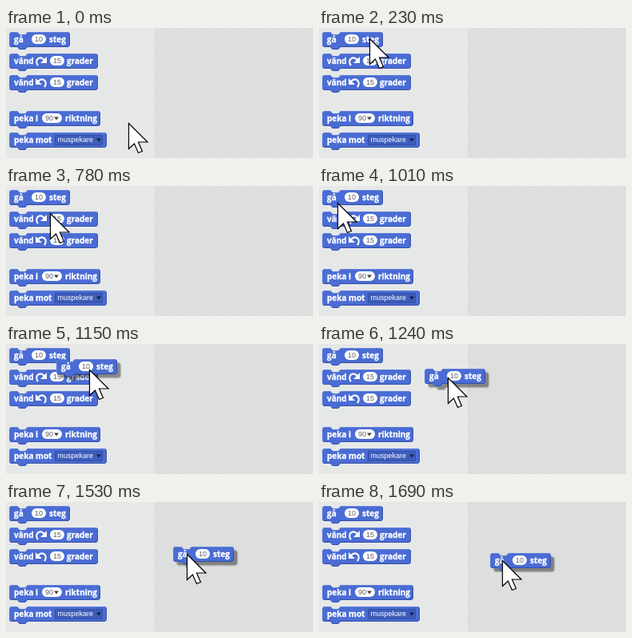
An HTML page with a canvas for the animation above (1.77 s loop, 384x163 px).

```html
<!DOCTYPE html>
<html lang="sv">
<head>
<meta charset="utf-8">
<title>Dra ett block</title>
<style>
  html, body { margin: 0; width: 100%; height: 100%; overflow: hidden; background: #e6e8e8; }
  canvas { display: block; width: 384px; height: 163px; }
</style>
</head>
<body>
<canvas id="stage" width="384" height="163"></canvas>
<script>
const ctx = document.getElementById('stage').getContext('2d');
const LOOP = 1770, STEPS = 23;
const CIRCLE_FROM = 3, REST_FROM = 12, DRAG_FROM = 14;
const LABEL = 'bold 10px "Open Sans", sans-serif';
const VALUE = '9px "Liberation Sans", sans-serif';

const mix = (a, b, t) => a + (b - a) * t;
const easeOut = (t, power) => 1 - Math.max(0, 1 - t) ** power;

function polygon(points) {
  const path = new Path2D();
  points.forEach(([x, y]) => path.lineTo(x, y));
  path.closePath();
  return path;
}

// Runs a drawing function with its own origin and canvas state.
function at(x, y, drawing) {
  ctx.save();
  ctx.translate(x, y);
  drawing();
  ctx.restore();
}

function text(str, x, y, font, color, align = 'left') {
  ctx.font = font;
  ctx.fillStyle = color;
  ctx.textAlign = align;
  ctx.fillText(str, x, y);
}

function label(str, x) {
  text(str, x, 13, LABEL, '#fff');
  ctx.strokeStyle = '#fff';
  ctx.lineWidth = .3;
  ctx.strokeText(str, x, 13);
}

function pill(x, width, value, valueX = x + width / 2) {
  ctx.fillStyle = '#fff';
  ctx.beginPath();
  ctx.roundRect(x, 3, width, 12, 6);
  ctx.fill();
  text(value, valueX, 12.3, VALUE, '#5c5f66', 'center');
}

function dropArrow(x, color) {
  ctx.fillStyle = color;
  ctx.fill(polygon([[x - 3, 7.5], [x + 3, 7.5], [x, 11.5]]));
}

function turnArrow(x, direction) {
  at(x, 9.5, () => {
    ctx.scale(direction, 1);
    ctx.strokeStyle = ctx.fillStyle = '#fff';
    ctx.lineWidth = 2.2;
    ctx.beginPath();
    ctx.moveTo(-4, 5.5);
    ctx.bezierCurveTo(-9, -1, -2, -8, 4, -1.5);
    ctx.stroke();
    ctx.fill(polygon([[7, -5.5], [7, 2.5], [-1, 2.5]]));
  });
}

// Outline with a notch in the top edge and a matching bump below.
function blockShape(w) {
  const notch = y => [[10, y], [13, y + 3], [20, y + 3], [23, y]];
  return polygon([
    [0, 2], [2, 0], ...notch(0), [w - 2, 0], [w, 2],
    [w, 17], [w - 2, 19], ...notch(19).reverse(), [2, 19], [0, 17]
  ]);
}

function bevel(shape, shift, color) {
  at(shift, shift, () => {
    ctx.strokeStyle = color;
    ctx.lineWidth = 1;
    ctx.stroke(shape);
  });
}

function block(x, y, width, drawContent, lifted = false) {
  const shape = blockShape(width);
  at(x, y, () => {
    ctx.save();
    if (lifted) {
      ctx.shadowColor = 'rgba(0,0,0,.42)';
      ctx.shadowOffsetX = ctx.shadowOffsetY = 4.5;
      ctx.shadowBlur = 1.5;
    }
    ctx.fillStyle = '#4a6cd4';
    ctx.fill(shape);
    ctx.restore();
    ctx.save();
    ctx.clip(shape);
    bevel(shape, .5, 'rgba(255,255,255,.12)');
    bevel(shape, -.5, 'rgba(20,35,100,.4)');
    ctx.restore();
    drawContent();
  });
}

function moveContent() {
  label('gå', 6);
  pill(28, 18, '10');
  label('steg', 50);
}

function turnContent(direction) {
  label('vänd', 6);
  turnArrow(40, direction);
  pill(51, 18, '15');
  label('grader', 72);
}

function directionContent() {
  label('peka i', 6);
  pill(41, 25, '90', 50);
  dropArrow(59, '#444');
  label('riktning', 70);
}

function targetContent() {
  label('peka mot', 6);
  ctx.fillStyle = '#3d5cba';
  ctx.fillRect(57, 3, 60, 13);
  ctx.strokeStyle = '#3350a3';
  ctx.lineWidth = 1;
  ctx.strokeRect(57.5, 3.5, 59, 12);
  text('muspekare', 60.5, 12.3, VALUE, '#fff');
  dropArrow(112, '#15224d');
}

function drawBackground() {
  ctx.fillStyle = '#e6e8e8';
  ctx.fillRect(0, 0, 384, 163);
  ctx.fillStyle = '#dddede';
  ctx.fillRect(186, 0, 198, 163);
  ctx.fillStyle = '#d5d6d6';
  const cross = (x, y) => {
    ctx.fillRect(x - 1, y, 3, 1);
    ctx.fillRect(x, y - 1, 1, 3);
  };
  for (let x = 187; x < 390; x += 23) {
    for (let y = 1; y < 170; y += 23) {
      cross(x + 10, y);
      cross(x, y + 10);
    }
  }
}

const pointerShape = polygon([
  [.5, .5], [.5, 32.5], [7.5, 26], [12.5, 37.5], [17.5, 35.5], [12.5, 24], [24, 24]
]);

function drawPointer(x, y) {
  at(x, y, () => {
    ctx.fillStyle = '#fff';
    ctx.fill(pointerShape);
    ctx.strokeStyle = '#000';
    ctx.lineWidth = 1.2;
    ctx.stroke(pointerShape);
  });
}

// The pointer comes in, circles the first block, rests on it and drags a copy away.
function pointerAt(step) {
  if (step < CIRCLE_FROM) {
    const t = step / CIRCLE_FROM;
    return [mix(153, 62, t), mix(119, 17, t)];
  }
  if (step < REST_FROM) {
    const degrees = step < 7 ? mix(-57, 251, (step - CIRCLE_FROM) / 4) : 251 + 60 * (step - 7);
    const angle = degrees * Math.PI / 180;
    return [43 + 37 * Math.cos(angle), 23 + 12 * Math.sin(angle)];
  }
  const elapsed = Math.max(0, step - DRAG_FROM);
  return [mix(23, 229, easeOut(elapsed / 6.5, 3)), mix(21, 73, easeOut(elapsed / 8, 1.85))];
}

function draw(time) {
  const step = Math.floor((time + 8) / LOOP * STEPS) % STEPS;
  const [x, y] = pointerAt(step).map(Math.round);
  drawBackground();
  block(4, 5, 76, moveContent);
  block(4, 32, 111, () => turnContent(1));
  block(4, 59, 111, () => turnContent(-1));
  block(4, 104, 114, directionContent);
  block(4, 131, 122, targetContent);
  if (step > DRAG_FROM) {
    // The block trails behind the pointer and catches up.
    const lag = .53 ** (step - DRAG_FROM - 2);
    block(Math.round(x - 15 - 14 * lag), Math.round(y - 9 - 2 * lag), 76, moveContent, true);
  }
  drawPointer(x, y);
}

const start = performance.now();
function tick() {
  draw((performance.now() - start) % LOOP);
  requestAnimationFrame(tick);
}
tick();
</script>
</body>
</html>
```
